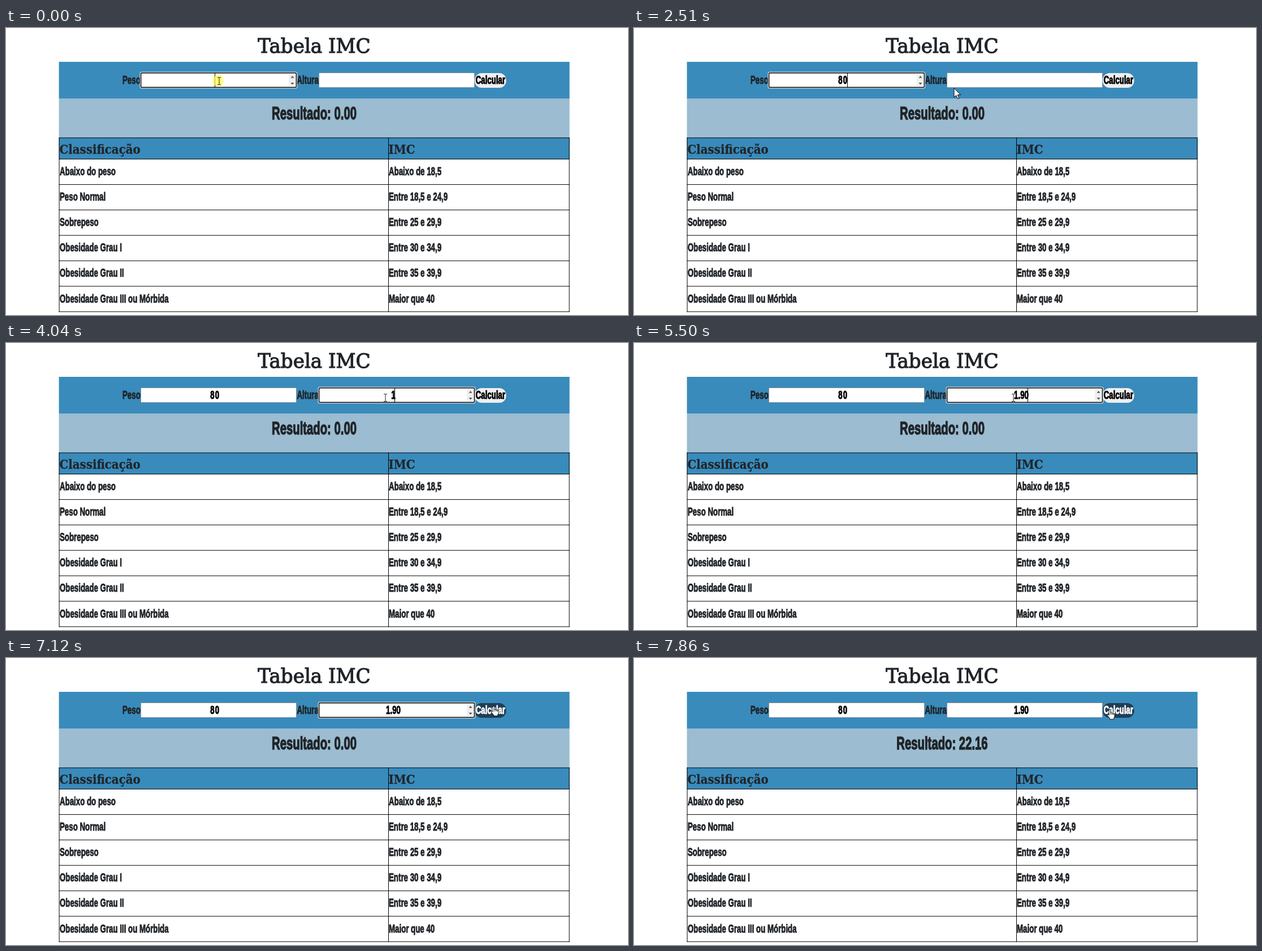
Recreate the animation shown at these times as an HTML page. Size 1100x509 px, loop 8 s.

```html
<!DOCTYPE html>
<html lang="pt-BR">
<head>
<meta charset="utf-8">
<title>Tabela IMC</title>
<style>
  html, body { margin: 0; width: 100%; height: 100%; overflow: hidden; background: #fff; }
  svg { display: block; width: 1100px; height: 509px; }
  text { fill: #212529; stroke: #212529; white-space: pre; }
  .cond { font: bold 20.3px "Liberation Sans", Arial, sans-serif; stroke-width: .95px; }
  .big { font-size: 31px; stroke-width: 1.4px; }
  .title { font: 36px "DejaVu Serif", serif; stroke-width: 1.2px; }
  .head { font: bold 22.5px "DejaVu Serif", serif; stroke-width: .3px; }
  .ink { fill: #000; stroke: #000; }
</style>
</head>
<body>
<svg id="stage" viewBox="0 0 1100 509" xmlns="http://www.w3.org/2000/svg"></svg>
<script>
const LOOP = 8000, STEP = 67;
const NS = "http://www.w3.org/2000/svg";
const stage = document.getElementById("stage");

function add(tag, attrs, parent = stage) {
  const el = document.createElementNS(NS, tag);
  for (const k in attrs) el.setAttribute(k, attrs[k]);
  parent.appendChild(el);
  return el;
}
const rect = (x, y, width, height, fill, extra = {}, parent = stage) =>
  add("rect", { x, y, width, height, fill, ...extra }, parent);

// Condensed faces share one horizontal factor per style.
const SQUEEZE = { cond: 0.655, title: 0.95, head: 0.88 };
function label(str, x, y, cls, anchor = "start") {
  const k = SQUEEZE[cls.split(" ")[0]];
  const el = add("text", {
    class: cls, "text-anchor": anchor, transform: `translate(${x} ${y}) scale(${k} 1)`
  });
  el.textContent = str;
  return el;
}
const show = (el, on) => el.setAttribute("visibility", on ? "visible" : "hidden");
const place = (el, x, y) => el.setAttribute("transform", `translate(${x} ${y})`);

// Page
const LEFT = 93.6, WIDTH = 903, TOP = 194.3, HEAD = 232, ROW = 45.1;
label("Tabela IMC", 545, 43.5, "title", "middle");
rect(LEFT, 60, WIDTH, 65, "#398bbc");
rect(LEFT, 125, WIDTH, 70, "#9bbcd1");
rect(LEFT, 195, WIDTH, 37, "#398bbc");
const result = label("", 545, 162, "cond big", "middle");

label("Classificação", 94.5, 222.7, "head");
label("IMC", 676.5, 222.7, "head");
const rows = [
  ["Abaixo do peso", "Abaixo de 18,5"],
  ["Peso Normal", "Entre 18,5 e 24,9"],
  ["Sobrepeso", "Entre 25 e 29,9"],
  ["Obesidade Grau I", "Entre 30 e 34,9"],
  ["Obesidade Grau II", "Entre 35 e 39,9"],
  ["Obesidade Grau III ou Mórbida", "Maior que 40"]
];
const line = y => rect(LEFT, y, WIDTH, 1, "#000");
line(TOP);
line(HEAD);
rows.forEach(([name, range], i) => {
  const y = 261 + i * ROW;
  label(name, 95, y, "cond");
  label(range, 677, y, "cond");
  line(HEAD + (i + 1) * ROW);
});
for (const x of [LEFT, 676, LEFT + WIDTH - 1])
  rect(x, TOP, 1, HEAD + rows.length * ROW + 1 - TOP, "#000");

// Form
label("Peso", 206, 99, "cond");
label("Altura", 514.5, 99, "cond");
const button = rect(829, 80, 55.5, 26, "#efefef", { rx: 12 });
const buttonText = label("Calcular", 830.5, 99, "cond ink");

function makeField(x, center, spacing) {
  rect(x + .5, 79.5, 275, 26, "#fff", { stroke: "#767676", "stroke-opacity": .65 });
  const ring = add("g", {});
  rect(x - .5, 78.5, 277, 28, "none", { stroke: "#fff", "stroke-width": 1.4, rx: 2.5 }, ring);
  rect(x + .6, 79.6, 274.8, 25.8, "#fff", { stroke: "#101010", "stroke-width": 1.6, rx: 1.5 }, ring);
  const spin = add("g", {});
  rect(x + 262, 82, 12, 21, "#efefef", {}, spin);
  add("path", {
    d: `M${x + 265.5} 88.5h6l-3-3.5zM${x + 265.5} 97h6l-3 3.5z`, fill: "#505050"
  }, spin);
  const text = label("", center, 99, "cond ink", "middle");
  text.style.letterSpacing = spacing + "px";
  return { x, ring, spin, text };
}
const weight = makeField(238, 369.8, 1.7);
const height = makeField(553, 685, 0);
const caret = rect(0, 80, 1, 25, "#000");

// Pointers, each drawn around its hot spot
const glow = add("circle", { r: 9.8, fill: "#ffff48", "fill-opacity": .72 });
const beam = add("path", {
  d: "M-3 -6.5h2.3l.7.6.7-.6h2.3M-3 6.5h2.3l.7-.6.7.6h2.3M0 -6V6",
  fill: "none", stroke: "#222", "stroke-width": 1
});
const arrow = add("path", {
  d: "M0 0V16.5L3.8 13L6.5 19L9 18L6.4 12H11.6Z",
  fill: "#fff", stroke: "#000", "stroke-width": 1
});
const hand = add("path", {
  d: "M-1.5 10V1.5Q-1.5 0 0 0T1.5 1.5V6Q3 4.8 4.2 6.3Q5.6 5.5 6.5 7Q8.5 6.4 8.5 8.5V12Q8 14 7 15.2V17.2H0V15.5L-4.5 10.2Q-4.5 8 -2.8 8.7Z" +
     "M1.5 6V9M4.2 6.5V9M6.5 7V9.5",
  fill: "#fff", stroke: "#000", "stroke-width": .9
});

// Timeline
const blinks = [[0, 430], [960, 1970], [2500, 3500], [4040, 4570],
  [4700, 5230], [5300, 6030], [6560, 7090]];
const typedWeight = [[0, "", 369], [1210, "8", 373], [1440, "80", 377]];
const typedHeight = [[0, "", 685], [4040, "1", 687], [4700, "1.", 689],
  [5300, "1.9", 693], [5500, "1.90", 696]];
const clicks = [[0, 375, 93.5], [2970, 669, 97], [7250, 861, 85]];
const moves = [
  { from: 2300, to: 2770, pts: [[377, 94], [480, 104], [652, 109], [671, 97]] },
  { from: 6500, to: 7120, pts: [[671, 97], [748, 127], [820, 108], [862.5, 85.5]] },
  { from: 7790, to: 7860, pts: [[862.5, 85.5], [850, 89], [841.5, 91.5]] }
];
const latest = (list, t) => list.filter(e => e[0] <= t).pop();

function pointer(t) {
  let pos = moves[0].pts[0];
  for (const { from, to, pts } of moves) {
    if (t < from) break;
    const n = Math.round((to - from) / STEP) + 1;
    const k = Math.min(n, Math.floor((t - from) / (to - from) * (n - 1) + 1e-6) + 1) / n;
    const p = k * (pts.length - 1);
    const i = Math.min(pts.length - 2, Math.floor(p));
    pos = pts[i].map((v, c) => v + (pts[i + 1][c] - v) * (p - i));
  }
  return pos;
}

function draw(t) {
  const [x, y] = pointer(t);
  const inRow = y >= 79 && y <= 106;
  const over = f => inRow && x >= f.x && x <= f.x + 276;
  const onButton = inRow && x >= 829 && x <= 884;
  const focus = t < 2970 ? weight : t < 7250 ? height : null;
  const w = latest(typedWeight, t), h = latest(typedHeight, t);

  weight.text.textContent = w[1];
  height.text.textContent = h[1];
  for (const f of [weight, height]) {
    show(f.ring, f === focus);
    show(f.spin, f === focus || over(f));
  }
  caret.setAttribute("x", (focus === weight ? w : h)[2]);
  show(caret, blinks.some(([a, b]) => t >= a && t < b));

  result.textContent = "Resultado: " + (t < 7320 ? "0.00" : (80 / 1.9 ** 2).toFixed(2));
  button.setAttribute("fill", onButton ? "#213d53" : "#efefef");
  buttonText.style.fill = buttonText.style.stroke = onButton ? "#fff" : "#000";

  const click = latest(clicks, t);
  place(glow, click[1], click[2]);
  show(glow, t - click[0] < 70);

  const onField = over(weight) || over(height);
  for (const [el, on] of [[beam, onField], [hand, onButton], [arrow, !onField && !onButton]]) {
    place(el, x, y);
    show(el, on);
  }
}

const start = performance.now();
function tick() {
  draw((performance.now() - start) % LOOP);
  requestAnimationFrame(tick);
}
draw(0);
requestAnimationFrame(tick);
</script>
</body>
</html>
```
